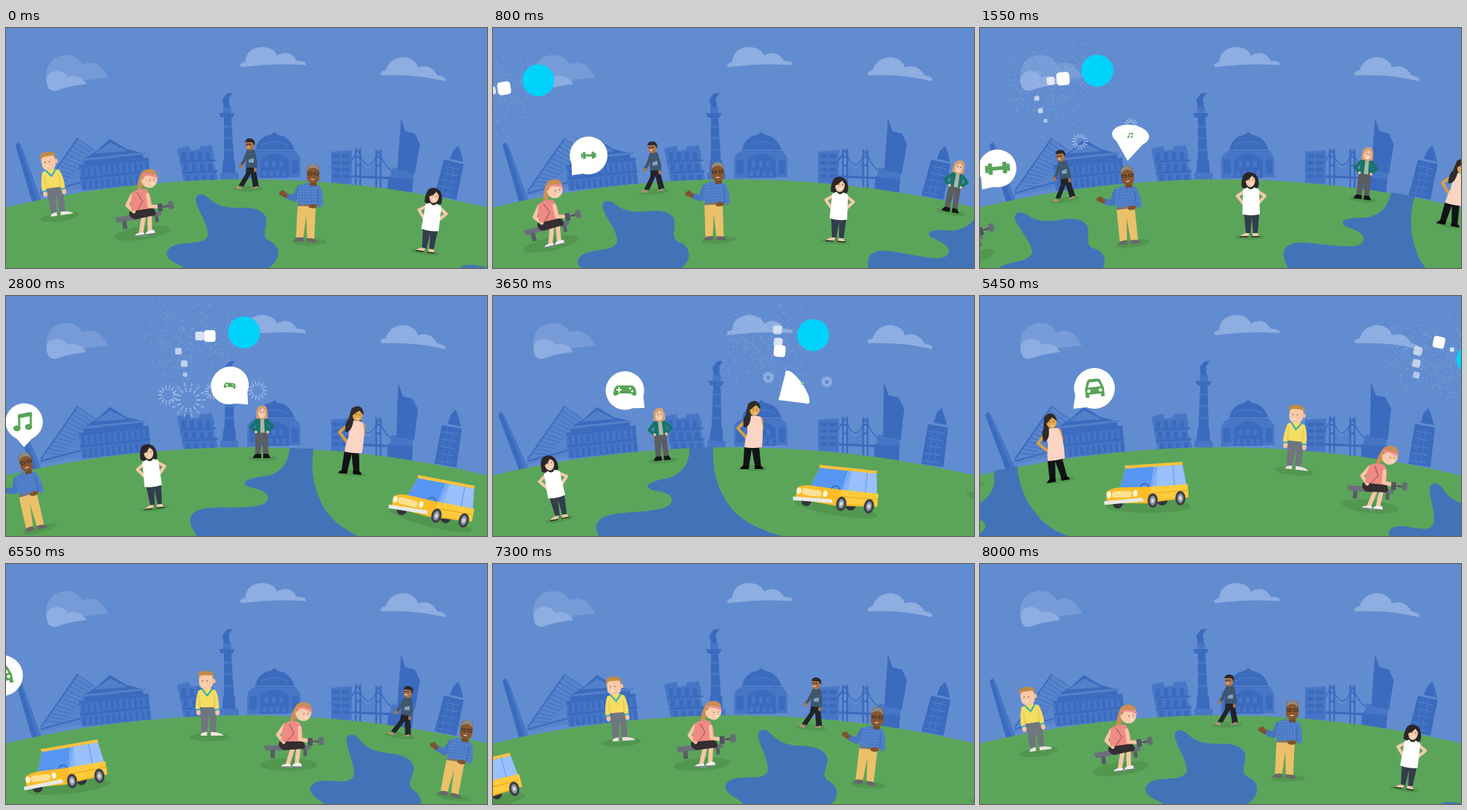
Animation, 660 px wide and 330 px high, one loop 8.05 s. Source, as an HTML page:

```html
<!DOCTYPE html>
<html lang="en">
<head>
<meta charset="utf-8">
<title>Turning globe</title>
<style>
html, body { margin: 0; width: 100%; height: 100%; overflow: hidden; background: #628cd0; }
svg { display: block; width: 100vw; height: 100vh; }
</style>
</head>
<body>
<svg id="stage" viewBox="0 0 660 330"></svg>
<script>
const LOOP = 8.05, CX = 330, CY = 1699;
const SPIN = 0.0943, FLIGHT = 0.0805, FLIGHT_R = 1649;
const DARK = '#3b6bbe', MID = '#4776c6', PALE = '#5480ca', WATER = '#4273b8', SHADE = '#52964f';

const clamp = v => Math.max(0, Math.min(1, v));
const smooth = (a, b, v) => { const u = clamp((v - a) / (b - a)); return u * u * (3 - 2 * u); };
const deg = r => r * 180 / Math.PI;
const p = (d, fill, extra = '') => `<path d="${d}" fill="${fill}" ${extra}/>`;
const line = (d, color, w) => p(d, 'none', `stroke="${color}" stroke-width="${w}" stroke-linecap="round" stroke-linejoin="round"`);
const oval = (x, y, rx, ry, fill) => `<ellipse cx="${x}" cy="${y}" rx="${rx}" ry="${ry}" fill="${fill}"/>`;
const box = (x, y, w, h, fill, r = 0) => `<rect x="${x}" y="${y}" width="${w}" height="${h}" rx="${r}" fill="${fill}"/>`;
const row = (n, make) => Array.from({ length: n }, (_, i) => make(i)).join('');

// Buildings that lean during the flight: [tilt, stretch, base x, base y, art]
const leaning = [
  [-4.5, 1, 42, 238, p('M13 161L17 157 21 162 48 236 36 240Z', DARK) + p('M17 157L21 162 48 236 43 238Z', MID)],
  [2.2, 1, 305, 207,
    p('M299 122h10l4 64h-14z', DARK) + p('M292 117h22l-3 6h-16z', DARK) + box(298, 108, 11, 9, MID) +
    p('M299 109L297 98 303 90 311 89 306 97 307 109Z', DARK) +
    box(299, 134, 11, 3, MID) + box(299, 150, 12, 3, MID) + box(299, 166, 13, 3, MID) +
    p('M298 182h16l2 26h-20z', DARK) + box(294, 199, 25, 9, MID)],
  [-3, 1.06, 543, 227,
    p('M525 204L559 206 557 228 523 221Z', DARK) + p('M530 192L560 196 559 208 527 205Z', MID) +
    p('M537 195L542 124 548 142 561 145 568 160 561 200Z', DARK)],
  [-4, 1.1, 605, 235,
    p('M609 180L614 168 621 162 624 171 627 184Z', DARK) + p('M601 181L628 187 618 236 588 230Z', DARK) +
    row(5, i => line(`M${602 - i * 2.5} ${190 + i * 9}l20 4`, PALE, 1.2)) +
    line('M608 187L597 230M615 189L605 232', MID, 1.5)]
];

const theatre = `<g transform="rotate(-6 150 195)">` +
  p('M108 176L128 166 147 152 168 168 190 176 190 184H108Z', DARK) + p('M124 170L147 157 169 171Z', PALE) +
  box(101, 183, 96, 36, MID) + box(101, 183, 96, 4, DARK) + box(101, 200, 96, 4, DARK) + box(104, 175, 90, 3, PALE) +
  row(12, i => box(104 + i * 8, 188, 4, 11, DARK) + box(104 + i * 8, 206, 4, 12, DARK)) + `</g>`;

const ruin = p('M235 166L251 162 254 169 265 167 266 163 282 161 286 174 284 182 291 208 244 212Z', MID) +
  row(4, i => box(241 + i * 11, 171, 6, 11, DARK)) + row(4, i => box(244 + i * 11, 187, 6, 9, DARK)) +
  line('M240 184L287 182M243 199L289 197', DARK, 3) + row(4, i => box(247 + i * 11, 202, 6, 8, DARK));

const dome = p('M341 171Q345 149 363 147L368 143 373 147Q391 149 397 171Z', DARK) +
  p('M331 207V181Q333 171 341 170H397Q404 174 404 184V205Z', MID) + line('M342 168H397', PALE, 2) +
  p('M349 206V182Q368 163 388 182V206Z', DARK) + row(3, i => box(355 + i * 10, 183, 5, 9, MID, 2)) +
  row(4, i => box(352 + i * 9, 196, 5, 8, MID, 2)) +
  box(334, 181, 10, 20, DARK, 3) + box(392, 181, 9, 20, DARK, 3) + line('M350 161Q368 152 387 161', MID, 2);

const block = p('M446 170L475 168 474 215 446 213Z', MID) +
  row(4, i => box(449, 174 + i * 9, 9, 5, DARK) + box(461, 174 + i * 9, 10, 5, DARK));

const suspension = line('M475 204L538 207', DARK, 3) +
  line('M480 167V216M486 167V216M508 168V219M514 168V219M480 177H486M480 189H486M508 177H514M508 189H514', DARK, 2.4) +
  line('M472 186L483 168Q497 208 511 169Q520 193 534 199', DARK, 1.5) +
  row(9, i => line(`M${487 + i * 2.4} ${183 + 11 * Math.sin(i * Math.PI / 8)}V205`, DARK, .6));

const cables = p('M98 151L121 166 103 220 45 232Z', PALE, 'opacity=".7"') +
  line('M98 152L48 224M48 227L104 212', DARK, 2) +
  row(13, i => line(`M${98 - i * 3.7} ${152 + i * 5.3}L${124 - i * 4} ${170 + i * 4}`, DARK, .9));

const clouds = p('M55 69Q54 41 80 37Q99 37 105 50Q127 41 140 68Q105 72 75 76Z', '#769bd6') +
  p('M57 80Q51 61 69 59Q82 59 84 67Q103 63 110 77Q84 80 70 86Q60 88 57 80Z', '#8eade0') +
  p('M323 54Q318 49 328 47Q330 27 352 26Q368 27 372 38Q389 28 399 45Q413 45 411 51Q367 48 323 54Z', '#8eade0') +
  p('M515 65Q511 60 521 58Q527 40 547 40Q563 43 565 54Q582 48 592 65Q606 68 602 73Q562 63 515 65Z', '#8eade0');

const face = (x, y, w = 3) => box(x - w, y, 1.5, 1.5, '#5a3a30', 1) + box(x + w, y, 1.5, 1.5, '#5a3a30', 1) +
  line(`M${x - 1} ${y + 6}q2 1 3 0`, '#fff', 1);

const lake = p('M260 236C262 226 271 228 277 233C290 246 305 248 326 247C350 247 360 257 357 270C355 282 352 288 362 293C377 300 376 315 368 323C360 332 345 345 330 350H262C255 345 248 330 236 325C220 318 215 308 228 300C245 292 272 300 277 285C278 270 262 250 260 236Z', WATER);
const river = p('M389 209C388 228 378 244 355 248C330 250 322 257 332 262C345 266 362 268 359 280C355 293 320 290 285 291C255 292 250 303 254 316C258 325 263 332 275 350H540L516 343C462 326 440 303 431 280C419 255 419 232 422 210Z', WATER);

const jumperMan = oval(279, 238, 27, 6, SHADE) +
  p('M267 195h22l-1 37h-8l-1-29-3 29h-8z', '#70767e') +
  p('M267 236q0-5 9-5v5zM281 231q12 0 17 4v1h-17z', '#ece5e0') +
  oval(264, 204, 3, 4, '#f6c3a0') + oval(290, 204, 3, 4, '#f6c3a0') + box(271, 167, 10, 8, '#f0b794') +
  p('M264 174q12-6 24 0q5 13 4 26h-6v-3h-20v3h-6q0-14 4-26z', '#f5dc62') +
  line('M269 172L276 181 283 172', '#36afb8', 2.2) + line('M261 200h5M286 200h5', '#36afb8', 2) +
  line('M266 181v16M286 181v16', '#dfc149', 1) +
  box(265, 149, 19, 23, '#f8c9a7', 8) + oval(285, 161, 2.5, 3, '#f6bd98') +
  p('M264 157v-6q1-4 11-4q12 0 10 11l-3-5h-14z', '#c08a47') + face(272, 160);

const athlete = oval(388, 276, 39, 9, SHADE) +
  p('M354 250L392 248 418 250V255L356 257Z', '#6a7079') + p('M363 256h6v11h-6zM408 255h5v9h-5z', '#575d66') +
  line('M402 249L399 274M394 251L387 274', '#f7c6a5', 6) +
  p('M377 279q2-5 13-4l2 5zM393 276q5-4 12-2l1 5h-13z', '#f1eeec') +
  line('M378 279h13M394 279h11', '#717780', 1.6) +
  p('M375 244L405 243Q412 246 410 254L381 256Q372 252 375 244Z', '#342e30') +
  p('M399 193Q390 205 389 222Q397 216 402 204Z', '#c98e56') +
  line('M382 222L373 235 381 245', '#f7c6a5', 5) +
  p('M382 219q12-6 21-1q6 13 3 26h-28q-1-10 4-25z', '#ee8b84') +
  line('M389 220L395 233 386 243', '#7a3e46', .8) +
  line('M403 225L403 241 421 244', '#f7c6a5', 5) + line('M419 244h13', '#555b63', 3) +
  box(414, 239, 7, 11, '#50565e', 2) + box(429, 238, 7, 11, '#666c75', 2) +
  oval(408, 204, 11, 12, '#f8cbab') + p('M398 204Q394 190 409 190Q418 190 420 200L405 197Z', '#c98e56') +
  line('M399 198Q410 196 419 203', '#f0898b', 2.6) + face(411, 205);

const walker = oval(332, 221, 21, 4, SHADE) +
  p('M330 190L342 191 347 218 339 219 336 200 326 218 319 217 329 200Z', '#20242b') +
  p('M313 220l6-3 5 3-2 2zM337 220l8-3 1 3-9 1z', '#b28d72') +
  line('M331 172L326 184 322 189M340 172L343 185 342 194', '#3f566b', 4) +
  oval(322, 190, 2, 3, '#ad754a') + oval(342, 195, 2, 3, '#ad754a') +
  p('M330 168q7-4 12 1l1 23h-14z', '#40576d') + p('M333 181l7-2v6h-7z', '#7fa5bf') +
  box(329, 153, 11, 15, '#ad754a', 5) + p('M328 157q1-6 8-5q7 1 5 10l-3-5z', '#2b2929') +
  line('M330 160h2M334 160h2', '#302a28', 1.3) + line('M331 164h3', '#fff', 1);

const glassesMan = oval(416, 294, 24, 5, SHADE) +
  p('M400 244L425 245 423 290 413 289 412 257 408 288 398 288Z', '#ebc069') +
  p('M395 293q1-6 13-5v6zM413 294v-5q12-1 14 6z', '#696669') +
  line('M403 220L396 235 386 231', '#4875c0', 8) + p('M375 225l6-2 6 7-3 4-9-5z', '#80522f') +
  p('M402 217q14-8 27-1q7 5 6 29l-5 2-2-3h-27q-2-14 1-27z', 'url(#plaid)') +
  line('M428 223v20', '#3b65ae', 1) + box(400, 242, 27, 3, '#777578') + oval(421, 245, 6, 3, '#80522f') +
  box(417, 208, 9, 9, '#744927') + box(413, 187, 17, 26, '#87572f', 7) +
  p('M413 196q1-9 9-9q7 0 8 10q-4-5-8-5q-5 0-9 4z', '#8f8c82') +
  line('M414 199h6v3h-5zM423 199h6v3h-5z', '#35302e', 1) + line('M419 208h4', '#efdccb', 1.2);

const tankWoman = oval(370, 287, 20, 4, SHADE) +
  p('M362 201Q369 195 378 201Q384 208 382 219Q371 224 359 219Q358 208 362 201Z', '#2b2728') +
  line('M362 225L353 231 361 241M382 225L391 231 382 241', '#f6c9a9', 4) +
  p('M362 254h21l-2 29h-6l-2-23-2 23h-6z', '#343d4b') +
  p('M356 286l8-4h6l-2 4zM374 282h7l2 4h-9z', '#eec9ab') + line('M357 287h10M373 287h10', '#2b2728', 1.4) +
  p('M361 222l6-3q5 6 9 0l7 3 1 34q-12 3-24 0z', '#fff') +
  oval(371, 210, 6.5, 9, '#f7cbaa') + p('M363 211q0-12 8-12q7 0 8 10l-6-6q-3 6-10 8z', '#2b2728') + face(371, 208, 2.5);

const jacketWoman = oval(352, 223, 20, 4, SHADE) +
  p('M342 187h17l1 30h-7l-2-21-2 21h-7z', '#5c5d60') + p('M339 223q1-5 4-6h7v6zM353 217h7l3 6h-10z', '#151617') +
  line('M343 172L336 180 343 187M359 172L366 179 359 186', '#187468', 4.5) +
  p('M343 169q8-4 16 0l1 19h-18z', '#187468') + p('M349 168h5l1 20h-6z', '#aeb5aa') +
  oval(343, 187, 2, 2, '#f1bd9a') + oval(359, 187, 2, 2, '#f1bd9a') +
  p('M344 156Q348 149 356 151Q360 158 359 168L352 170 343 168Z', '#d59e70') +
  box(346, 153, 10, 15, '#f6c8a9', 5) + p('M345 161q0-10 8-10q6 1 5 9l-6-6z', '#d59e70') + face(351, 159, 2);

const dressWoman = oval(357, 237, 20, 4, SHADE) +
  p('M345 206h20l3 31h-8l-5-27-4 27h-8z', '#121314') + p('M339 238q2-5 6-5h6v5zM359 233h7q4 1 5 5h-12z', '#090a0a') +
  line('M348 170L336 182 347 194', '#dba045', 4) + line('M368 169L369 181 364 200', '#dba045', 4.5) + line('M362 194h6', '#24201f', 3) +
  p('M349 166q9-3 18 0q5 15 2 42q-13 2-24 0q1-12 4-20z', '#fbd4c4') +
  p('M350 148Q358 141 365 148L364 164 354 164Q353 181 344 181Q342 168 347 163Z', '#302b2b') +
  oval(359, 156, 7, 9, '#e2a84c') + p('M351 158Q349 145 360 144Q367 147 367 156L361 150Z', '#302b2b') + face(359, 155, 2.5);

const wheel = (x, y) => oval(x, y, 7, 10, '#3b4048') + oval(x, y, 4, 6.5, '#8f969f') + oval(x, y, 2, 3, '#d8dadd');
const car = oval(233, 289, 58, 9, SHADE) + oval(191, 285, 7, 7, '#30343a') + oval(252, 281, 7, 7, '#30343a') +
  p('M202 236L280 231 286 263 193 266Z', '#88b4f8') + p('M202 237L241 234 236 264 193 266Z', '#5797f3') +
  p('M246 235L279 232 285 260 245 262Z', '#9bc1fb') + line('M244 234L237 264M267 233L269 262', '#70a4f2', 1.6) +
  p('M200 233L280 228V232L202 237Z', '#fbc13d') + line('M222 264q1-7 8-6q4 2 3 6', '#3763a9', 1.4) +
  p('M175 270Q180 264 194 263L242 262 287 259 288 277 230 285 176 284Z', '#fbbc27') +
  p('M236 262L287 259 288 276 236 281Z', '#ffcb3d') + line('M238 271L287 267', '#e2a217', 1) +
  box(183, 268, 27, 9, '#ffe194', 4) + oval(179, 273, 3, 4.5, '#fff7dc') + oval(215, 271, 3, 4.5, '#fff7dc') +
  p('M172 282L225 277 227 282 173 287Z', '#e9e9e7') + wheel(239, 281) + wheel(277, 278);

// Everything on the globe, drawn as seen at its own moment
const riders = [
  [0, lake], [2.8, river], [0, walker], [6.55, jumperMan], [2.8, jacketWoman], [3.65, dressWoman],
  [6.55, athlete], [0, glassesMan], [1.55, tankWoman], [5.435, car]
];

const GREEN = '#57a458';
const icons = {
  dumbbell: `<g transform="rotate(-6)">` + line('M-8 0H8', GREEN, 5) + box(-13, -8, 6, 16, GREEN, 2) + box(7, -8, 6, 16, GREEN, 2) +
    box(-17, -5, 4, 10, GREEN, 1) + box(13, -5, 4, 10, GREEN, 1) + '</g>',
  music: line('M-7 8V-9L9 -12V6', GREEN, 3) + line('M-7 -7L9 -10', GREEN, 4) + oval(-10, 9, 5, 4, GREEN) + oval(6, 7, 5, 4, GREEN),
  pad: p('M-10-7H10Q15-6 16 5Q13 10 8 4H-8Q-13 10-16 5Q-15-6-10-7Z', GREEN) +
    line('M-11-1h6M-8-4v6', '#fff', 1.8) + oval(7, -3, 1.5, 1.5, '#fff') + oval(10, 1, 1.5, 1.5, '#fff'),
  car: `<g transform="rotate(-6)">` + p('M-13 0L-9-11Q-8-13-5-13H5Q8-13 9-11L13 0V12H8V8H-8V12H-13Z', GREEN) +
    p('M-9-2L-6-9H6L9-2Z', '#fff') + oval(-8, 3, 2.3, 2.3, '#fff') + oval(8, 3, 2.3, 2.3, '#fff') + '</g>'
};

// [moment drawn, pop time, x, y, radius, tail x, tail y, icon]
const bubbles = [
  [1.55, .4, 24, 193, 26, 3, 222, 'dumbbell'], [2.8, 1.31, 25, 173, 25.5, 25, 208, 'music'],
  [3.65, 2.44, 181, 130, 26.5, 208, 154, 'pad'], [5.45, 3.48, 157, 127, 28, 128, 155, 'car']
];

// Opens like a fan from the tail tip, then rounds into a circle with a narrow tail
function bubbleShape(x, y, r, tx, ty, grow) {
  const dist = Math.hypot(x - tx, y - ty), ux = (x - tx) / dist, uy = (y - ty) / dist;
  const rx = r * Math.min(1, 2.5 * grow), ry = r * grow ** 1.3, mid = dist * Math.min(1, 2 * grow);
  const open = .42 + 1.1 * (1 - grow);
  const rim = side => {
    const across = side * rx * Math.sin(open), along = mid - ry * Math.cos(open);
    return `${tx + ux * along - uy * across} ${ty + uy * along + ux * across}`;
  };
  return `M${tx} ${ty}L${rim(-1)}A${ry} ${rx} ${deg(Math.atan2(uy, ux))} 1 1 ${rim(1)}Z`;
}

// [x, y, radius, start]
const bursts = [[137, 156, 16, 1.1], [207, 134, 13, 1.1], [222, 136, 18, 2.2], [250, 143, 27, 2.2], [283, 131, 15, 2.3],
  [345, 130, 18, 2.25], [378, 112, 14, 3.35], [458, 118, 14, 3.35]];

// Trailing blocks: [dx, dy, size] relative to the flyer at each key time
const keyTimes = [1.55, 2.8, 3.65, 5.45];
const blocks = [
  [[-47, 11, 18], [-47, 5, 16], [-46, 22, 16], [-46, -23, 16]],
  [[-64, 14, 11], [-61, 5, 12], [-48, 10, 12], [-28, -13, 6]],
  [[-83, 38, 7], [-90, 26, 9], [-49, -7, 12], [-75, -11, 12]],
  [[-78, 55, 7], [-82, 43, 9], [-70, 20, 0], [-77, 6, 11]],
  [[-71, 69, 5], [-81, 58, 6], [-72, 30, 0], [-77, 22, 9]]
];
const blockAlpha = [1, .75, .6, .6, .5];

let seed = 7;
const rand = () => (seed = seed * 16807 % 2147483647) / 2147483647;
const dust = Array.from({ length: 400 }, () => ({ phase: rand(), dx: rand() * 24 - 22, dy: (rand() + rand() - 1) * 72 }));

const stage = document.getElementById('stage');
stage.innerHTML = `<defs><pattern id="plaid" width="4" height="4" patternUnits="userSpaceOnUse">
  <rect width="4" height="4" fill="#4878c5"/><path d="M0 .5H4M.5 0V4" stroke="#5f8bd0" stroke-width=".7"/></pattern></defs>` +
  box(0, 0, 660, 330, '#628cd0') + clouds + cables + theatre + ruin + dome + block + suspension +
  leaning.map(b => `<g class="lean">${b[4]}</g>`).join('') +
  bursts.map(() => '<path class="burst" fill="none" stroke="#b4c9ee" stroke-width="1.8" stroke-dasharray="6 2"/>').join('') +
  oval(CX, 1640, 1432, 1432, '#5ba55b') +
  riders.map(r => `<g class="rider">${r[1]}</g>`).join('') +
  '<path id="dust" fill="none" stroke="#fff" stroke-opacity=".25" stroke-width="1.3" stroke-linecap="round"/>' +
  blocks.map((_, i) => `<rect class="block" fill="#fff" opacity="${blockAlpha[i]}"/>`).join('') +
  '<circle id="flyer" r="22" fill="#00d3fb"/>' +
  bubbles.map(b => `<g class="bubble"><path class="pop" fill="#fff"/><g class="icon">${icons[b[7]]}</g></g>`).join('');

const all = s => [...stage.querySelectorAll(s)];
const leanEls = all('.lean'), burstEls = all('.burst'), riderEls = all('.rider'), blockEls = all('.block');
const bubbleEls = all('.bubble'), popEls = all('.pop'), iconEls = all('.icon');
const dustEl = document.getElementById('dust'), flyerEl = document.getElementById('flyer');
const turn = dt => `rotate(${deg(-SPIN * dt)} ${CX} ${CY})`;
const wrap = dt => dt - LOOP * Math.round(dt / LOOP);

function flyerAt(t) {
  const a = -.1027 + FLIGHT * (t - 1.55);
  return [CX + FLIGHT_R * Math.sin(a), CY - FLIGHT_R * Math.cos(a), a];
}

function blockPose(keys, t) {
  const i = t < keyTimes[1] ? 0 : t < keyTimes[2] ? 1 : 2;
  const u = smooth(keyTimes[i], keyTimes[i + 1], t);
  return keys[i].map((v, k) => v + (keys[i + 1][k] - v) * u);
}

function render(t) {
  const sway = smooth(1.7, 3.4, t) - smooth(5.45, 6.5, t);
  leaning.forEach(([tilt, stretch, x, y], i) => leanEls[i].setAttribute('transform',
    `translate(${x} ${y}) rotate(${tilt * sway}) scale(1 ${1 + (stretch - 1) * sway}) translate(${-x} ${-y})`));

  riders.forEach(([at], i) => riderEls[i].setAttribute('transform', turn(wrap(t - at))));

  bursts.forEach(([x, y, r, start], i) => {
    const u = clamp((t - start) / .9), outer = r * (1 - (1 - u) ** 2), inner = outer * (.3 + .25 * u);
    burstEls[i].setAttribute('d', row(14, k => {
      const c = Math.cos(k * Math.PI / 7), s = Math.sin(k * Math.PI / 7);
      return `M${x + inner * c} ${y + inner * s}L${x + outer * c} ${y + outer * s}`;
    }));
    burstEls[i].setAttribute('opacity', u > 0 && u < 1 ? .65 * Math.min(1, (1 - u) * 3) : 0);
  });

  const [fx, fy, fa] = flyerAt(t);
  flyerEl.setAttribute('cx', fx);
  flyerEl.setAttribute('cy', fy);
  blocks.forEach((keys, i) => {
    const [dx, dy, size] = blockPose(keys, t), el = blockEls[i];
    el.setAttribute('transform', `translate(${fx + dx} ${fy + dy}) rotate(${deg(fa)})`);
    el.setAttribute('x', -size / 2);
    el.setAttribute('y', -size / 2);
    el.setAttribute('width', size);
    el.setAttribute('height', size);
    el.setAttribute('rx', size / 4);
  });
  dustEl.setAttribute('d', dust.map(d => {
    const age = (t + d.phase) % 1, [x, y] = flyerAt(t - age * .9);
    return `M${(x + d.dx).toFixed(1)} ${(y + 10 + d.dy).toFixed(1)}h.01`;
  }).join(''));

  bubbles.forEach(([at, pop, x, y, r, tx, ty], i) => {
    const age = t - pop;
    bubbleEls[i].setAttribute('visibility', age > .01 && age < 3.8 ? 'visible' : 'hidden');
    bubbleEls[i].setAttribute('transform', turn(t - at));
    popEls[i].setAttribute('d', bubbleShape(x, y, r, tx, ty, smooth(0, .4, age)));
    iconEls[i].setAttribute('transform', `translate(${x} ${y}) scale(${clamp((age - .1) / .5)})`);
  });
}

const begin = performance.now();
function tick() {
  const step = Math.floor((performance.now() - begin) / 50);
  render(step * .05 % LOOP);
  requestAnimationFrame(tick);
}
tick();
</script>
</body>
</html>
```
